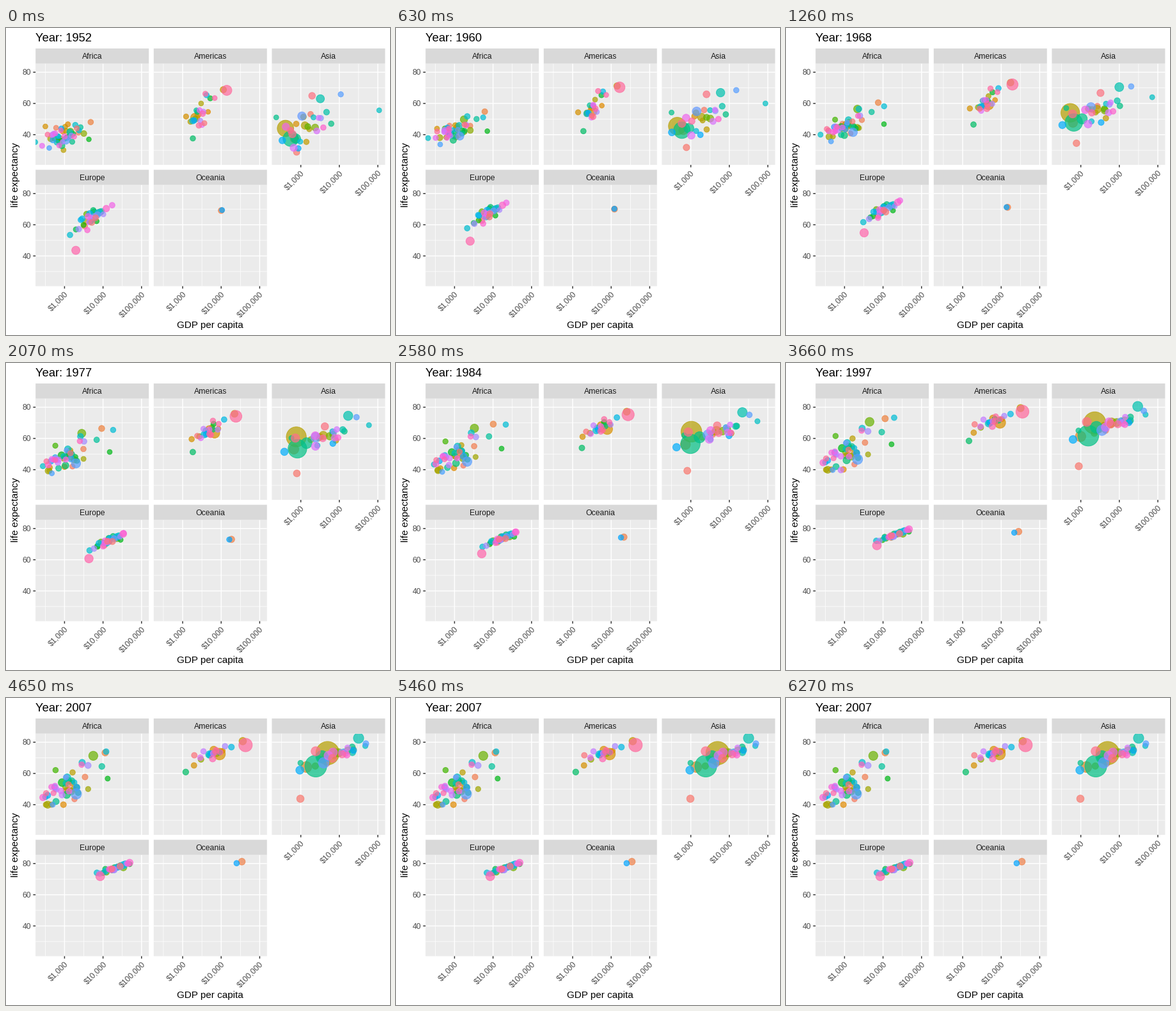
A matplotlib script that plays this animation: 600x480 px, repeating every 6.3 s.

```python
import numpy as np
import matplotlib.pyplot as plt
from matplotlib.animation import FuncAnimation
from matplotlib.patches import Rectangle

plt.rcParams["font.family"] = "Liberation Sans"
plt.rcParams["path.snap"] = False

W, H, DPI = 600, 480, 100
FRAMES, MOVING, INTERVAL = 210, 149, 30
PT = DPI / 72
PANEL_W, PANEL_H, STRIP_H, GAP = 176.96, 158.4, 23.6, 7.64
LEFT, TOP = 46.2, 55.6
DECADE, YEAR_PX = 60.18, 2.4405
LOG_MIN, LIFE_MAX = 2.2485, 85.55
COUNTRIES, POP_MAX = 142, 1318.7
YEARS = np.arange(1952, 2008, 5)
KEYS = np.round(MOVING * np.arange(12) / 11)
rng = np.random.default_rng(7)


def hcl(hue, chroma=100, lum=65):
    """Polar LUV colour to sRGB."""
    h = np.radians(hue)
    y = ((lum + 16) / 116) ** 3
    u = chroma * np.cos(h) / (13 * lum) + 0.19784
    v = chroma * np.sin(h) / (13 * lum) + 0.46834
    x = 9 * y * u / (4 * v)
    z = -x / 3 - 5 * y + 3 * y / v
    rgb = np.clip([3.2405 * x - 1.5372 * y - 0.4985 * z,
                   -0.9693 * x + 1.876 * y + 0.0416 * z,
                   0.0556 * x - 0.204 * y + 1.0573 * z], 0, 1)
    return np.where(rgb > 0.00304, 1.055 * rgb ** (1 / 2.4) - 0.055, 12.92 * rgb)


def trend(start, end, progress):
    """Parabola that has covered the share `progress` of the way in 1977."""
    s = (YEARS - 1952) / 55
    m = 25 / 55
    bend = (progress - m) / (m * (1 - m))
    return start + (end - start) * (s + bend * s * (1 - s))


def dip(year, width, depth):
    return -depth * np.clip(1 - abs(YEARS - year) / width, 0, None)


def cloud(n, pop, gdp, life):
    """Scattered countries: spread of start GDP, then linear links with noise."""
    p = (np.arange(n) + 0.5) / n
    z = np.log(p / (1 - p)) / 1.7
    mean0, sd, mean1, carry, noise, progress = gdp
    life0, slope0, noise0, life1, slope1, noise1 = life
    g0 = mean0 + sd * z
    g1 = np.clip(mean1 + carry * sd * z + noise * rng.normal(size=n), 2.44, 4.69)
    l0 = np.clip(life0 + slope0 * (g0 - mean0) + noise0 * rng.normal(size=n), 30, 72.5)
    l1 = np.clip(life1 + slope1 * (g1 - mean1) + noise1 * rng.normal(size=n), 40, 82.2)
    people = np.clip(pop * np.exp(rng.normal(size=n)), 0.2, 8 * pop)
    ids = rng.choice(np.arange(1, COUNTRIES + 1), n, replace=False)
    return [(i, m, 10 ** a, 10 ** b, progress, c, d)
            for i, m, a, b, c, d in zip(ids, people, g0, g1, l0, l1)]


fig = plt.figure(figsize=(W / DPI, H / DPI), dpi=DPI, facecolor="white")
ax = fig.add_axes([0, 0, 1, 1])
ax.set_xlim(0, W)
ax.set_ylim(H, 0)
ax.axis("off")


def line(xs, ys, px, color, z):
    ax.plot(xs, ys, color=color, lw=px / PT, zorder=z, solid_capstyle="butt")


def label(x, y, s, size, color="black", **kw):
    return ax.text(x, y, s, fontsize=size, color=color, va="baseline",
                   parse_math=False, zorder=6, **kw)


class Panel:
    """One facet; rows hold id, population, GDP from/to, GDP progress, life from/to."""

    def __init__(self, name, col, row, rows, young, life_progress, dips={}):
        self.x = LEFT + col * (PANEL_W + GAP)
        self.y = TOP + row * (PANEL_H + GAP + STRIP_H)
        self.frame(name, y_axis=col == 0, x_axis=row == 1 or col == 2)

        rows = sorted(rows)
        ids = [r[0] for r in rows]
        _, pop, gdp0, gdp1, progress, life0, life1 = np.array(rows).T[:, :, None]
        life = trend(life0, life1, life_progress)
        for who, args in dips.items():
            spot = next(k for k, r in enumerate(rows) if r[0] == who and r[1] in args[:1])
            life[spot] += dip(*args[1:])
        share = pop * (young + (1 - young) * (YEARS - 1952) / 55) / POP_MAX
        self.px = self.to_x(trend(np.log10(gdp0), np.log10(gdp1), progress))
        self.py = self.to_y(life)
        self.radius = 1.4818 * (2 + 10 * np.sqrt(share)) + 0.49

        colors = [hcl(15 + 360 * (i - 1) / COUNTRIES) for i in ids]
        self.dots = ax.scatter(self.px[:, 0], self.py[:, 0], c=colors,
                               edgecolors=colors, alpha=0.7,
                               linewidths=0.98 / PT, zorder=4)
        self.dots.set_clip_path(Rectangle((self.x, self.y), PANEL_W, PANEL_H,
                                          transform=ax.transData))

    def to_x(self, log_gdp):
        return self.x + (log_gdp - LOG_MIN) * DECADE

    def to_y(self, life):
        return self.y + (LIFE_MAX - life) * YEAR_PX

    def frame(self, name, y_axis, x_axis):
        x0, y0, x1, y1 = self.x, self.y, self.x + PANEL_W, self.y + PANEL_H
        ax.add_patch(Rectangle((x0, y0), PANEL_W, PANEL_H, fc="#EBEBEB", lw=0, zorder=1))
        ax.add_patch(Rectangle((x0, y0 - STRIP_H), PANEL_W, STRIP_H,
                               fc="#D9D9D9", lw=0, zorder=5))
        label((x0 + x1) / 2, y0 - 7.4, name, 8.8, "#1A1A1A", ha="center")
        for life in range(30, 81, 10):
            y, major = self.to_y(life), life % 20 == 0
            line([x0, x1], [y, y], 1.48 if major else 0.74, "white", 3 if major else 2)
            if y_axis and major:
                line([x0 - 3.82, x0], [y, y], 1.48, "#333333", 3)
                label(x0 - 6.9, y + 4.3, str(life), 8.8, "#4D4D4D", ha="right")
        for power in np.arange(2.5, 5.1, 0.5):
            x, major = self.to_x(power), power % 1 == 0
            line([x, x], [y0, y1], 1.48 if major else 0.74, "white", 3 if major else 2)
            if x_axis and major:
                line([x, x], [y1, y1 + 3.82], 1.48, "#333333", 3)
                label(x + 6.2, y1 + 13.1, f"${10 ** int(power):,}", 8.8, "#4D4D4D",
                      ha="right", rotation=45, rotation_mode="anchor")

    def show(self, i):
        j = min(np.searchsorted(KEYS, i, "right") - 1, 10)
        k = (i - KEYS[j]) / (KEYS[j + 1] - KEYS[j])
        x, y, r = (v[:, j] * (1 - k) + v[:, j + 1] * k
                   for v in (self.px, self.py, self.radius))
        self.dots.set_offsets(np.column_stack([x, y]))
        self.dots.set_sizes((2 * r / PT) ** 2)


africa = cloud(47, 8, (2.96, .27, 3.15, .9, .3, .75), (39, 6, 4.5, 54, 14, 6))
africa += [(39, 80.3, 1419, 5581, .49, 41.9, 71.3),
           (46, 1.5, 4293, 13206, 1.1, 37, 56.7),
           (76, 6, 2388, 12057, 1.25, 42.7, 74),
           (95, 135, 1077, 2014, .97, 36.3, 46.9),
           (108, 8.9, 493, 863, .55, 40, 46.2)]
americas = cloud(21, 7, (3.46, .17, 3.87, .8, .2, .7), (53, 22, 6, 73.3, 6, 1.8))
americas += [(15, 190, 2109, 9066, .79, 50.9, 72.4),
             (21, 33.4, 11367, 36319, .57, 68.8, 80.7),
             (54, 8.5, 1840, 1202, 0, 37.6, 60.9),
             (135, 301, 13990, 42952, .48, 68.4, 78.2)]
asia = cloud(24, 18, (3.2, .37, 3.92, .75, .33, .62), (48, 12, 7, 72, 8, 2))
asia += [(1, 31.9, 779, 975, .05, 28.8, 43.8),
         (9, 150, 684, 1391, -.05, 37.5, 64.1),
         (25, 1318.7, 400, 4959, .25, 44, 73),
         (59, 1110, 547, 2452, .26, 37.4, 64.7),
         (60, 223.5, 750, 3541, .4, 37.5, 70.7),
         (67, 127.5, 3217, 31656, .72, 63, 82.6),
         (72, 2.5, 108382, 47307, .73, 55.6, 77.6),
         (88, 47.8, 331, 944, .11, 36.3, 62.1),
         (138, 85, 605, 2442, .12, 40.4, 74.2)]
europe = cloud(29, 9, (3.69, .23, 4.36, .75, .12, .72), (65, 14, 2.5, 77.7, 9, .8))
europe += [(132, 71.2, 1969, 8458, .53, 43.6, 71.8)]
oceania = [(6, 20.4, 10040, 34435, .49, 69.1, 81.2),
           (92, 4.1, 10557, 25185, .49, 69.4, 80.2)]

panels = [
    Panel("Africa", 0, 0, africa, .28, .72, {108: (8.9, 1992, 7, 22)}),
    Panel("Americas", 1, 0, americas, .4, .58),
    Panel("Asia", 2, 0, asia, .4, .58, {25: (1318.7, 1962, 6, 7)}),
    Panel("Europe", 0, 1, europe, .75, .6),
    Panel("Oceania", 1, 1, oceania, .45, .32),
]

title = label(LEFT, 20.9, "", 13.2)
label(319.3, 469.1, "GDP per capita", 11, ha="center")
label(18.6, 229.7, "life expectancy", 11, ha="center", rotation=90,
      rotation_mode="anchor")


def update(frame):
    i = min(frame, MOVING)
    title.set_text(f"Year: {round(1952 + 55 * i / MOVING)}")
    for panel in panels:
        panel.show(i)


anim = FuncAnimation(fig, update, frames=FRAMES, interval=INTERVAL,
                     init_func=lambda: update(0), repeat=True, repeat_delay=0)
plt.show()
```
